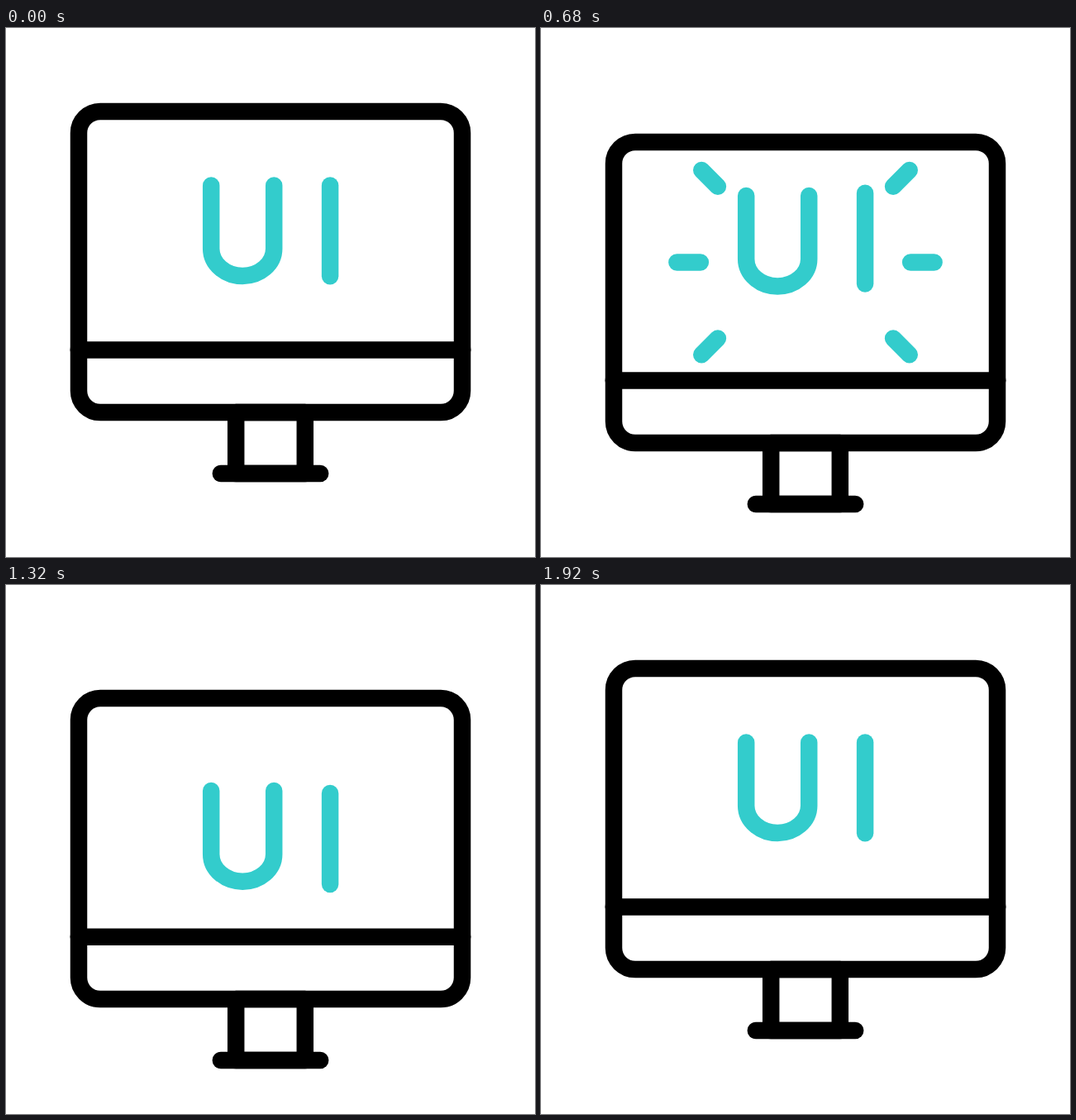
Write an HTML page that moves like this. It is 640 px wide and 640 px high and loops after 1960 ms.

```html
<!DOCTYPE html>
<html lang="en">
<head>
<meta charset="utf-8">
<title>UI monitor</title>
<style>
  html, body { margin: 0; width: 100%; height: 100%; overflow: hidden; background: #fff; }
  svg { display: block; width: 100%; height: 100%; fill: none; stroke-width: 20.5; stroke-linecap: round; stroke-linejoin: round; }
</style>
</head>
<body>
<svg viewBox="0 0 640 640">
  <g id="scene">
    <g stroke="#000">
      <rect x="88" y="101" width="464" height="364" rx="26"/>
      <path d="M87.8 389.6H552.2"/>
      <path d="M278.2 465H361.8V539H278.2Z"/>
      <path d="M259.8 539H380.2"/>
    </g>
    <g stroke="#33cccc">
      <path id="letterU" d="M248.2 190.4V267A38 33 0 0 0 324.2 267V190.4"/>
      <path id="letterI" d="M392.1 190.4V300.2"/>
      <path id="rays"/>
    </g>
  </g>
</svg>
<script>
  const LOOP = 1960, STEP = 40, DELAY = 120;
  const EASE = 0.57;
  const CENTER = { x: 320, y: 246.6 };
  const byId = id => document.getElementById(id);

  // Symmetric cubic-bezier(EASE, 0, 1 - EASE, 1)
  function ease(x) {
    if (x <= 0) return 0;
    if (x >= 1) return 1;
    let lo = 0, hi = 1;
    for (let i = 0; i < 24; i++) {
      const s = (lo + hi) / 2, r = 1 - s;
      if (3 * r * r * s * EASE + 3 * r * s * s * (1 - EASE) + s ** 3 < x) lo = s;
      else hi = s;
    }
    return lo * lo * (3 - 2 * lo);
  }

  // keys: [time, value] pairs, eased between neighbours
  function track(keys, t) {
    let value = keys[0][1];
    for (let i = 1; i < keys.length; i++) {
      const [t0, v0] = keys[i - 1], [t1, v1] = keys[i];
      value += (v1 - v0) * ease((t - t0) / (t1 - t0));
    }
    return value;
  }

  const screenKeys = [[40, 0], [1000, 45], [1920, 0]];
  const letterKeys = [[40, 0], [560, -27.7], [1125, 26], [1785, 0]];
  const rayKeys = [[437, 120.5], [1037, 240]];

  function rayPath(t) {
    const head = track(rayKeys, t), tail = track(rayKeys, t - DELAY);
    if (head - tail < 0.02) return '';
    const diagonal = d => 106 + (d - 127) * 0.69;
    let path = '';
    const segment = (x0, y0, x1, y1) => {
      path += `M${CENTER.x + x0} ${CENTER.y + y0}L${CENTER.x + x1} ${CENTER.y + y1}`;
    };
    const a = diagonal(tail), b = diagonal(head);
    for (const sx of [-1, 1]) {
      segment(sx * tail, 0, sx * head, 0);
      for (const sy of [-1, 1]) {
        segment(sx * a, sy * (a - 14.2), sx * b, sy * (b - 14.2));
      }
    }
    return path;
  }

  const shift = (id, y) => byId(id).setAttribute('transform', `translate(0 ${y})`);

  function draw(t) {
    shift('scene', track(screenKeys, t));
    shift('letterU', track(letterKeys, t));
    shift('letterI', track(letterKeys, t - DELAY));
    byId('rays').setAttribute('d', rayPath(t));
  }

  const start = performance.now();
  function tick() {
    const t = (performance.now() - start) % LOOP;
    draw(Math.floor(t / STEP) * STEP);
    requestAnimationFrame(tick);
  }
  tick();
</script>
</body>
</html>
```
